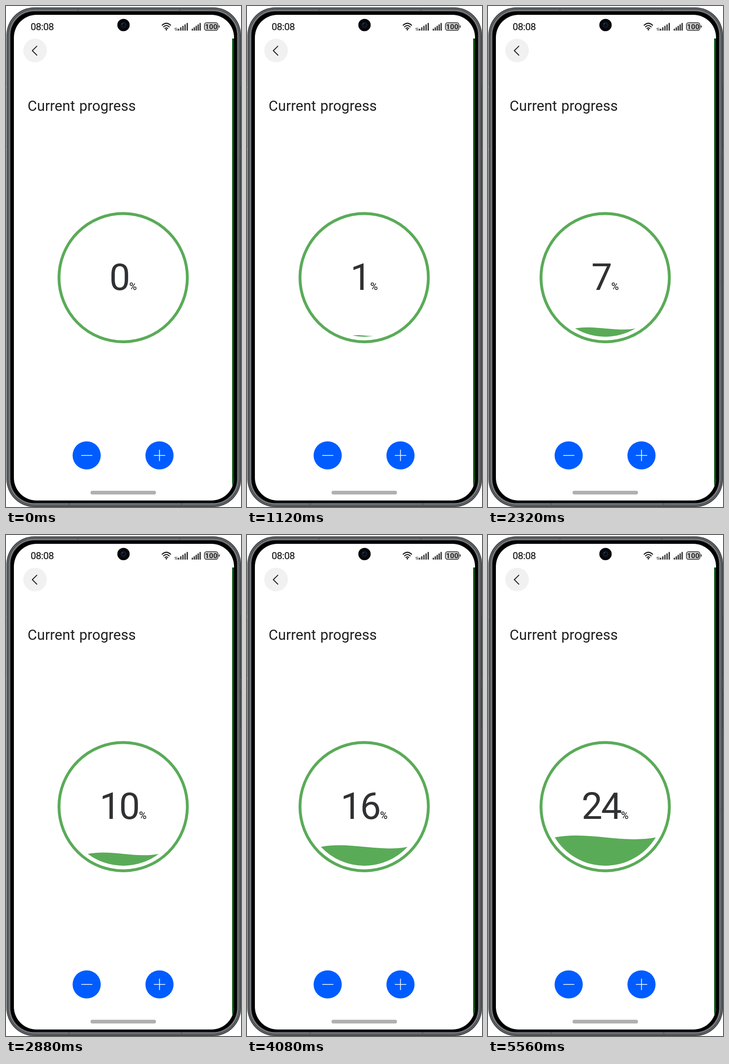
Animation, 506 px wide and 1080 px high, one loop 5600 ms. Source, as an HTML page:

```html
<!DOCTYPE html>
<html lang="en">
<head>
<meta charset="utf-8">
<title>Current progress</title>
<style>
  html, body { margin: 0; width: 100%; height: 100%; overflow: hidden; background: #fff; }
  svg { display: block; width: 506px; height: 1080px; }
  text { font-family: Roboto, "Noto Sans", sans-serif; fill: #1f1f21; }
  .digit { font-size: 80px; text-anchor: middle; fill: #303133; }
  .line { fill: none; stroke-linecap: round; stroke-linejoin: round; }
</style>
</head>
<body>
<svg viewBox="0 0 506 1080">
  <!-- body, antenna bands, side keys -->
  <g id="body"></g>
  <path d="M155 4v7M374 4v7M136 1073v6M378 1073v6M1 175h5M1 309h5M500 147h5M500 330h5M500 593h5"
        stroke="#55595c" stroke-width="4" opacity=".6"/>
  <path d="M505.5 173V309M505.5 333V417" stroke="#1d1f22"/>
  <rect x="17" y="19" width="474" height="1047" rx="49" fill="#fff"/>
  <path d="M487 70H491V1017Q491 1026 487 1035Z" fill="#00500a"/>

  <!-- status bar -->
  <text x="53" y="52" font-size="21" letter-spacing="-.5" stroke="#1f1f21" stroke-width=".3">08:08</text>
  <circle cx="253" cy="41" r="13.3" fill="#050608"/>
  <circle cx="253" cy="41" r="6.5" fill="#111a2b"/>
  <circle cx="253" cy="41" r="3" fill="#060a14"/>
  <circle cx="250.5" cy="38.5" r="1.2" fill="#34507c"/>
  <path d="M336.2 41.5Q345.3 33 354.4 41.5M339.2 45Q345.3 39.4 351.4 45M342.3 48.4Q345.3 45.8 348.3 48.4"
        class="line" stroke="#1c1c1e" stroke-width="2.2"/>
  <circle cx="345.3" cy="51" r="1.8" fill="#1c1c1e"/>
  <path d="M364.8 53v-6l-1.5 2M367.8 47v6l1.5-2" class="line" stroke="#1c1c1e"/>
  <g id="bars" stroke="#1c1c1e" stroke-width="2.5"></g>
  <rect x="427.3" y="36" width="29" height="16.6" rx="4.5" fill="#cfcfcf" stroke="#2a2a2a" stroke-width="1.5"/>
  <path d="M459 42v4.6" stroke="#2a2a2a" stroke-width="2"/>
  <text x="441.8" y="50" font-size="15.5" font-weight="700" text-anchor="middle">100</text>

  <!-- page -->
  <circle cx="62.6" cy="96" r="25.4" fill="#f1f1f2"/>
  <path d="M66.4 86.6L56.6 96.3L66.4 106" class="line" stroke="#222" stroke-width="2"/>
  <text x="46.6" y="225.8" font-size="31" letter-spacing=".05" word-spacing="1.5">Current progress</text>

  <circle cx="252.3" cy="585.6" r="138.2" fill="none" stroke="#5aab58" stroke-width="6.2"/>
  <path id="water" fill="#5aab58"/>
  <text id="tens" class="digit" x="224" y="612"></text>
  <text id="ones" class="digit" y="612"></text>
  <text id="sign" y="612" font-size="22" stroke="#303133" stroke-width=".25">%</text>

  <g fill="#005cff">
    <circle cx="173.7" cy="968.8" r="30.3"/>
    <circle cx="330.5" cy="968.8" r="30.3"/>
  </g>
  <path d="M162 968.8h24M318.3 968.8h24.6M330.5 956.5v24.6" stroke="#fff" stroke-width="1.6"/>
  <rect x="182" y="1045" width="141" height="8" rx="4" fill="#b0b0b0"/>
</svg>
<script>
const LOOP = 5600, START = 950, STEP = 200;
const CX = 252.5, CY = 585.6, R = 127.3;
const el = id => document.getElementById(id);

function add(parent, name, attrs) {
  const node = document.createElementNS("http://www.w3.org/2000/svg", name);
  for (const key in attrs) node.setAttribute(key, attrs[key]);
  el(parent).append(node);
}

// nested rims: inset, colour
[[0, "#303236"], [1.2, "#5f6265"], [4, "#45484b"], [5.5, "#96989b"], [7, "#505356"], [8.7, "#000"]]
  .forEach(([d, fill]) => add("body", "rect", {
    x: 1 + d, y: 3 + d, width: 505 - 2 * d, height: 1077 - 2 * d, rx: 60 - d, fill
  }));

// signal strength: left edge, gap
for (const [x, gap] of [[371.8, 4.6], [401.2, 4.2]])
  for (let i = 0; i < 5; i++)
    add("bars", "path", { d: `M${x + i * gap} 53v${-4 - i * 3.1}` });

// chord at the fill level, bent into one wave, closed by the bowl
function waterPath(value) {
  if (!value) return "";
  const dy = R * (1 - value / 50);
  const half = Math.sqrt(R * R - dy * dy);
  const y = CY + dy, bend = half * 0.13;
  return `M${CX - half} ${y}C${CX - half / 3} ${y - bend} ${CX + half / 3} ${y + bend} ` +
         `${CX + half} ${y}A${R} ${R} 0 0 1 ${CX - half} ${y}Z`;
}

let shown = -1;
function show(value) {
  if (value === shown) return;
  shown = value;
  const wide = value > 9;
  el("tens").textContent = wide ? Math.floor(value / 10) : "";
  el("ones").textContent = value % 10;
  el("ones").setAttribute("x", wide ? 266 : 245);
  el("sign").setAttribute("x", wide ? 286.5 : 265.5);
  el("water").setAttribute("d", waterPath(value));
}

const begin = performance.now();
function tick() {
  const t = Math.max(0, performance.now() - begin) % LOOP;
  show(t < START ? 0 : 1 + Math.floor((t - START) / STEP));
  requestAnimationFrame(tick);
}
tick();
</script>
</body>
</html>
```
